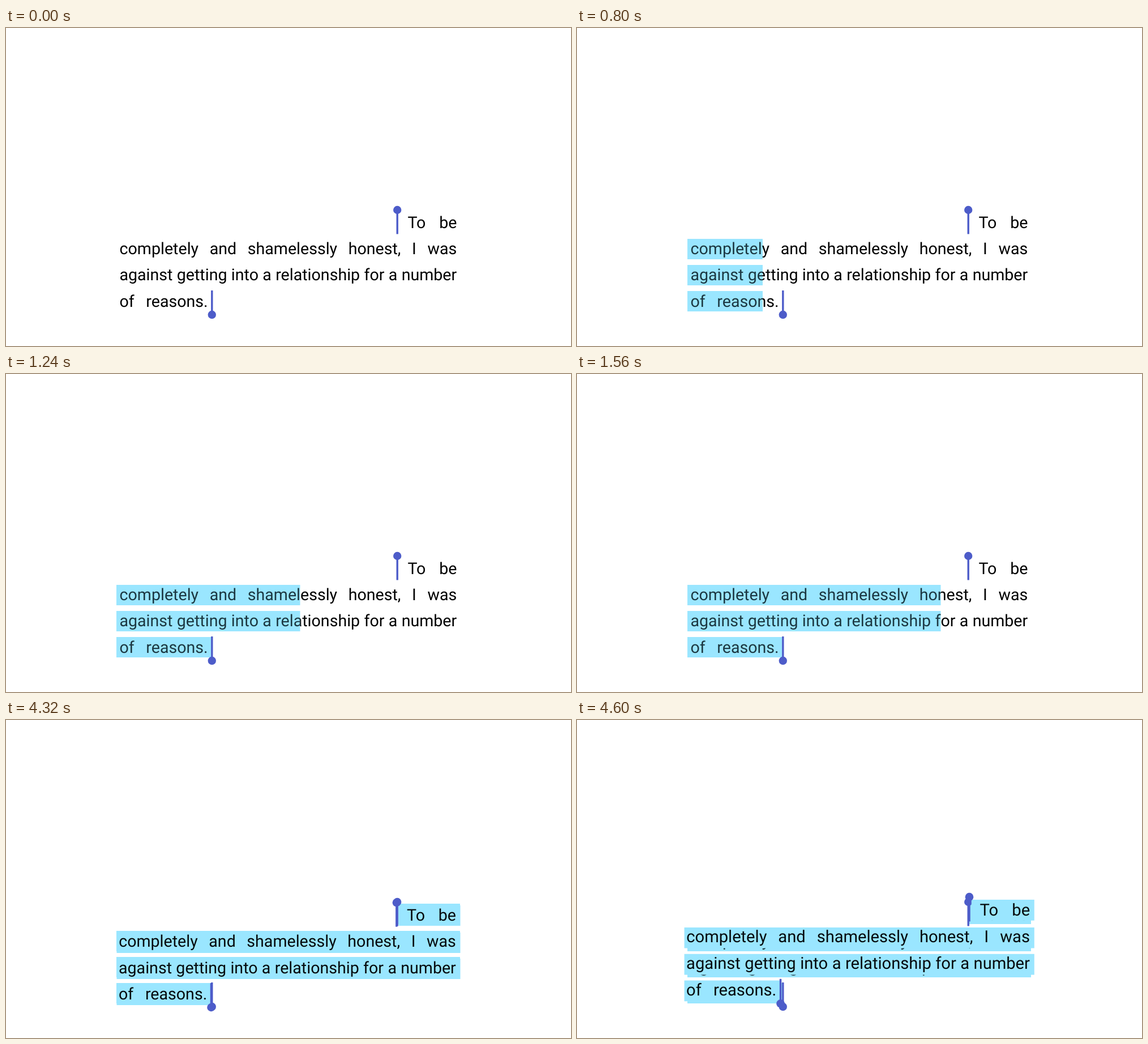
These frames come from a looping animation (998x561 px, 4640 ms). An HTML page with a canvas:

```html
<!DOCTYPE html>
<html lang="en">
<head>
<meta charset="utf-8">
<style>
  html, body { margin: 0; height: 100%; overflow: hidden; background: #fff; }
  canvas { display: block; }
</style>
</head>
<body>
<canvas id="stage" width="998" height="561"></canvas>
<script>
const ctx = document.getElementById('stage').getContext('2d');
const LOOP = 4640, STEP = 40, ZOOM_START = 4320;

// Each line: words, left and right text edge, marker box
const lines = [
  { words: 'To be', left: 709.4, right: 796.4, box: [693, 324, 802, 360] },
  { words: 'completely and shamelessly honest, I was', left: 200.6, right: 796.2, box: [195, 372, 802, 408] },
  { words: 'against getting into a relationship for a number', left: 200.4, right: 796.2, box: [195, 418, 802, 454] },
  { words: 'of reasons.', left: 200.4, right: 356.6, box: [195, 464, 362, 500] }
];

// Right edge of the marker over time
const sweep = [[460, 195], [800, 328], [1000, 410], [1240, 519.5], [1560, 642.5], [1960, 802]];

function sweepEdge(t) {
  if (t <= sweep[0][0]) return sweep[0][1];
  for (let i = 1; i < sweep.length; i++) {
    const [t0, x0] = sweep[i - 1], [t1, x1] = sweep[i];
    if (t <= t1) return x0 + (x1 - x0) * (t - t0) / (t1 - t0);
  }
  return 802;
}

function drawText(color) {
  ctx.font = '28.6px Roboto, sans-serif';
  ctx.textRendering = 'geometricPrecision';
  ctx.fillStyle = color;
  lines.forEach((line, row) => {
    const words = line.words.split(' ');
    const widths = words.map(w => ctx.measureText(w).width);
    const used = widths.reduce((a, b) => a + b, 0);
    const gap = (line.right - line.left - used) / (words.length - 1);
    let x = line.left;
    words.forEach((word, i) => {
      ctx.fillText(word, x, 353 + row * 46.2);
      x += widths[i] + gap;
    });
  });
}

function boxPath(edge, dx, dy) {
  ctx.beginPath();
  for (const { box: [x0, y0, x1, y1] } of lines) {
    const w = Math.min(x1, edge) - x0;
    if (w > 0) ctx.rect(x0 + dx, y0 + dy, w, y1 - y0);
  }
}

function drawMarker(edge, dx = 0, dy = 0) {
  ctx.fillStyle = '#9ae6ff';
  boxPath(edge, dx, dy);
  ctx.fill();
}

function drawHandle(x, barTop, knobY) {
  ctx.fillStyle = '#4d5cc9';
  ctx.fillRect(x - 1.7, barTop, 3.4, 42.5);
  ctx.beginPath();
  ctx.arc(x, knobY, 7.2, 0, Math.PI * 2);
  ctx.fill();
}

function drawHandles() {
  drawHandle(691.2, 321, 321);
  drawHandle(363.8, 463, 505.8);
}

function drawSelection(edge) {
  drawText('#000');
  drawMarker(edge);
  ctx.save();
  boxPath(edge, 0, 0);
  ctx.clip();
  drawText('#1c3841');
  ctx.restore();
  drawHandles();
}

// Enlarging copy laid over the resting selection
function drawZoom(t) {
  const p = Math.pow((t - ZOOM_START) / 280, 1.5);
  const scale = 1 + 0.0185 * p;
  ctx.save();
  ctx.translate(-1.4 - 9.6 * p, 1.2 - 16 * p);
  ctx.scale(scale, scale);
  drawMarker(802, 1.9, 1.8);
  drawText('#050a0c');
  drawHandles();
  ctx.restore();
}

function frame(now) {
  const t = Math.floor(now % LOOP / STEP) * STEP;
  ctx.fillStyle = '#fff';
  ctx.fillRect(0, 0, 998, 561);
  drawSelection(sweepEdge(t));
  if (t >= ZOOM_START) drawZoom(t);
}

const start = performance.now();
function tick() {
  frame(performance.now() - start);
  requestAnimationFrame(tick);
}
tick();
</script>
</body>
</html>
```
